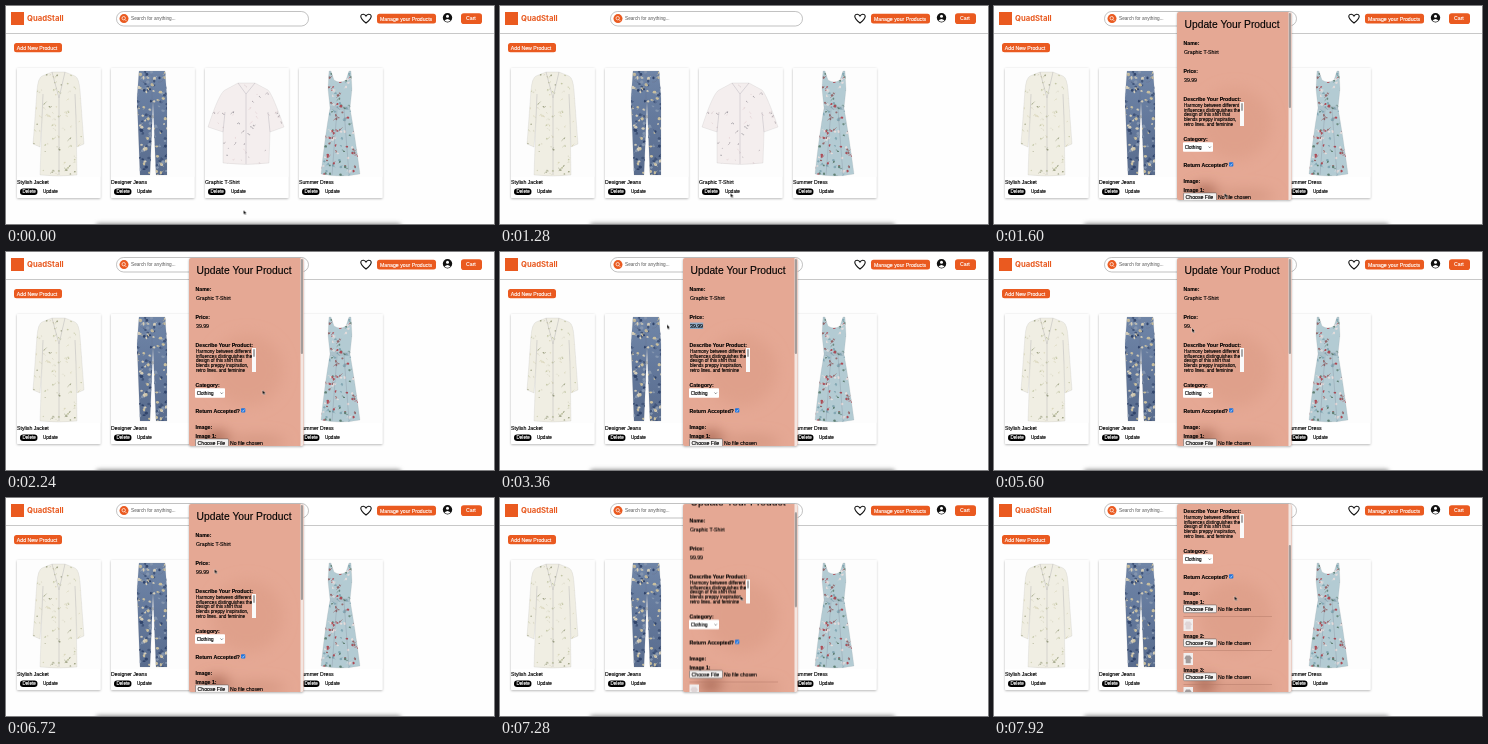
Write an HTML page that moves like this. It is 488 px wide and 218 px high and loops after 8 s.

```html
<!DOCTYPE html>
<html lang="en">
<head>
<meta charset="utf-8">
<title>Manage products</title>
<style>
  html, body { margin: 0; width: 100%; height: 100%; overflow: hidden; background: #fff; }
  svg { display: block; width: 488px; height: 218px; }
  text { font-family: "Liberation Sans", Arial, sans-serif; font-size: 5.2px; fill: #000; stroke: #000; stroke-width: .14px; white-space: pre; }
  .brand { font: 700 7.7px Inter, sans-serif; fill: #e8591f; stroke: none; }
  .light { fill: #fff; stroke: #fff; }
  .hint { font-size: 4.7px; fill: #555; stroke: none; }
  .label { font-weight: 700; }
</style>
</head>
<body>
<svg id="stage" viewBox="0 0 488 218" xmlns="http://www.w3.org/2000/svg"></svg>
<script>
const LOOP = 8000;
const ORANGE = '#ea5a20';
const stage = document.getElementById('stage');

const rect = (x, y, w, h, fill, r = 0, extra = '') =>
  `<rect x="${x}" y="${y}" width="${w}" height="${h}" rx="${r}" fill="${fill}" ${extra}/>`;
const text = (x, y, str, extra = '') => `<text x="${x}" y="${y}" ${extra}>${str}</text>`;
const label = (y, str) => text(189.5, y, str, 'class="label"');
const small = size => `style="font-size:${size}px"`;

function randomizer(seed) {
  return () => (seed = (seed * 16807) % 2147483647) / 2147483647;
}

// Scatters short sprigs and blossoms over a garment's bounding box.
function pattern(g, seed) {
  const rnd = randomizer(seed);
  const [x, y, w, h] = g.box;
  let out = '';
  for (let i = 0; i < g.count; i++) {
    const px = x + rnd() * w, py = y + rnd() * h;
    const color = g.tints[i % g.tints.length];
    const dx = rnd() * 6 - 3, dy = rnd() * 5 - 2.5;
    out += `<path d="M${px} ${py}q${dy} ${dx} ${dx} ${dy}" fill="none" stroke="${color}" stroke-width=".6"/>` +
      `<ellipse cx="${px}" cy="${py}" rx="${g.dot * (.6 + rnd() * .6)}" ry="${g.dot * (.5 + rnd() * .7)}" fill="${color}"/>`;
  }
  return out;
}

const products = [
  {
    name: 'Stylish Jacket', fill: '#f0eee3', box: [26, 66, 53, 104], count: 85, dot: .8,
    tints: ['#c3c6a4', '#dbd7bd', '#9fa385', '#dedccb'],
    shape: 'M46 66L59 66 69 70Q73 72 74 84L78 138 71 141 70 112 71 169Q53 171 34 169L36 112 34 141 27 138 31 84Q32 72 36 70Z',
    lines: 'M46 66L53 92 59 66M53 92V169M36 112L37 88M70 112L69 88'
  },
  {
    name: 'Designer Jeans', fill: 'url(#denim)', box: [130, 65, 32, 106], count: 130, dot: 1.5,
    tints: ['#31456c', '#c9bf9f', '#8495ae', '#42567b', '#d3ccb8'],
    shape: 'M133 65H159L161 92 161 169H150L147 96 144 169H134L131 92Z',
    lines: 'M133 69H159M146 69V94M133 71Q134 77 140 76M158 71Q157 77 152 76'
  },
  {
    name: 'Graphic T-Shirt', fill: '#f4eeee', box: [202, 76, 77, 83], count: 60, dot: .5,
    tints: ['#aaa2a8', '#d5c7c9', '#8f8b93', '#e2d2d3'],
    shape: 'M232 77H249L262 84Q266 87 278 121L264 126 263 157Q241 160 217 157L217 126 202 121Q213 87 219 84Z',
    lines: 'M232 77L240 88 249 77M240 88V158M217 126L219 106M264 126L262 106'
  },
  {
    name: 'Summer Dress', fill: '#b3cbd3', box: [314, 65, 41, 106], count: 150, dot: 1.15,
    tints: ['#ad4a54', '#5f7f72', '#e3dcdc', '#84a8b4', '#94676a'],
    shape: 'M323 65H325L328 74Q334 78 340 74L343 65H345L346 83 344 102Q349 130 354 168Q335 172 315 168Q319 130 324 102L322 83Z',
    lines: 'M324 101H344M324 103H344M331 104L326 169M338 104L343 169'
  }
];

function card(p, i) {
  const x = 11 + 94 * i;
  return rect(x, 62, 83.5, 130, '#fff', 1, 'filter="url(#shadow)"') +
    rect(x, 62, 83.5, 109, '#fdfdfd', 1) +
    `<clipPath id="cut${i}"><path d="${p.shape}"/></clipPath>
     <path d="${p.shape}" fill="${p.fill}" stroke="#888" stroke-opacity=".25" stroke-width=".5"/>
     <g clip-path="url(#cut${i})">${pattern(p, 9176 + 57713 * i)}
       <path d="${p.lines}" fill="none" stroke="#667" stroke-opacity=".4" stroke-width=".5"/></g>` +
    text(x, 178, p.name) +
    rect(x + 3, 182.5, 17.5, 6.5, '#000', 3.2) +
    text(x + 5.5, 187.4, 'Delete', `class="light" ${small(4.6)}`) +
    rect(x + 23.5, 182.5, 19, 6.5, '#fff', 3.2) +
    text(x + 26, 187.4, 'Update', small(4.6));
}

const header =
  rect(0, 0, 488, 27, '#fff') + rect(0, 27, 488, 1, '#c8c8c8') +
  rect(5, 6, 13, 13, ORANGE) + text(21, 15.3, 'QuadStall', 'class="brand"') +
  rect(110.5, 5.5, 192, 14.5, '#fff', 7.2, 'stroke="#999" stroke-width=".6"') +
  `<circle cx="118" cy="12.6" r="4.5" fill="${ORANGE}"/>
   <path d="M119 13.6l1.6 1.6M119.4 12.2a1.7 1.7 0 1 1-3.4 0a1.7 1.7 0 1 1 3.4 0" fill="none" stroke="#fff" stroke-width=".7"/>` +
  text(125, 14.3, 'Search for anything...', 'class="hint"') +
  `<path d="M360 17C352 11 355 8 357.4 8.2Q359.2 8.4 360 10Q360.8 8.4 362.6 8.2C365 8 368 11 360 17Z" fill="none" stroke="#111" stroke-width="1.1"/>` +
  rect(371, 7.8, 59, 9.8, ORANGE, 2.5) + text(374, 14.5, 'Manage your Products', 'class="light"') +
  `<circle cx="441.5" cy="11.8" r="4.7" fill="#111"/><circle cx="441.5" cy="10.2" r="1.5" fill="#fff"/>
   <path d="M438.5 14.4q3-3 6 0q-3 2.6-6 0" fill="#fff"/>` +
  rect(455, 7.2, 21, 10.8, ORANGE, 2.8) + text(460, 14.4, 'Cart', 'class="light"');

const blurb = ['Harmony between different', 'influences distinguishes the',
  'design of this shirt that', 'blends preppy inspiration,', 'retro lines, and feminine'];

const textarea = `<clipPath id="areaCut"><rect x="189" y="96" width="61" height="24"/></clipPath>
  <g clip-path="url(#areaCut)">` +
  blurb.map((line, i) => text(190, 100.6 + 4.9 * i, line, small(4.6))).join('') +
  rect(246, 96, 4, 24, '#fafafa') + rect(247, 97, 2, 8, '#aaa', 1) + '</g>';

function imageField(n) {
  const y = 185.5 + 34 * (n - 1);
  return label(y, `Image ${n}:`) +
    rect(189.5, y + 1.4, 33, 7.8, '#f3f0ef', 1, 'stroke="#555" stroke-width=".5"') +
    text(191.5, y + 7.1, 'Choose File') + text(224, y + 7.1, 'No file chosen') +
    rect(189.5, y + 12.8, 88.5, .5, '#b47a68') +
    rect(189.5, y + 15.5, 9.5, 12, '#f1eeee') +
    `<path d="M192 ${y + 18}h4l2 3-1.3 1v3.8h-5v-3.8l-1.3-1z" fill="${n === 1 ? '#dfd5d6' : '#a39b9b'}"/>`;
}

// Price field contents and the moment each one appears.
const prices = [[0, '39.99'], [5000, '9'], [5200, '99'], [5420, '99.'], [5640, '99.9'], [5860, '99.99']];

const modal = `<g id="modal">` +
  rect(183, 6, 114.5, 188, '#e5a894', 2, 'filter="url(#shadow)"') +
  `<g clip-path="url(#modalCut)">
   <g filter="url(#blur)">
     <ellipse cx="241" cy="118" rx="36" ry="36" fill="#dfa08b"/>
     <ellipse cx="211" cy="187" rx="13" ry="8" fill="#a96954"/>
     <ellipse cx="250" cy="190" rx="30" ry="6" fill="#d39580"/>
   </g>
   <g id="content">` +
  text(190.5, 22, 'Update Your Product', small(10.3)) +
  label(39, 'Name:') + text(190, 48, 'Graphic T-Shirt') +
  label(67, 'Price:') + rect(190, 70.6, 13.2, 6.4, '#91abc6', 0, 'id="selection"') +
  prices.map(([, value], i) => text(190, 75.8, value, `id="price${i}"`)).join('') +
  label(95, 'Describe Your Product:') + textarea +
  label(135, 'Category:') + rect(189, 136.2, 30, 9.6, '#fff', .8) +
  text(190.7, 142.6, 'Clothing', small(4.6)) +
  `<path d="M214.5 140.5l1.2 1.3 1.2-1.3" fill="none" stroke="#222" stroke-width=".5"/>` +
  label(160.5, 'Return Accepted?') + rect(235, 156.3, 4.3, 4.3, '#1f73dc', .8) +
  `<path d="M236 158.5l.9 1 1.5-2" fill="none" stroke="#fff" stroke-width=".6"/>` +
  label(176.5, 'Image:') + [1, 2, 3].map(imageField).join('') + '</g>' +
  rect(294.5, 6, 3, 188, '#f3e6e1') + rect(294.8, 7, 2.2, 95, '#a39d9b', 1.1, 'id="thumb"') + '</g></g>';

stage.innerHTML = `<defs>
    <filter id="shadow" x="-10%" y="-10%" width="120%" height="120%">
      <feDropShadow dx="0" dy=".8" stdDeviation="1.2" flood-opacity=".3"/></filter>
    <filter id="blur" x="-30%" y="-30%" width="160%" height="160%"><feGaussianBlur stdDeviation="7"/></filter>
    <filter id="soft" x="-5%" y="-100%" width="110%" height="300%"><feGaussianBlur stdDeviation="2"/></filter>
    <linearGradient id="denim" x2="0" y2="1"><stop stop-color="#7086a8"/><stop offset=".5" stop-color="#63789b"/><stop offset="1" stop-color="#596c8d"/></linearGradient>
    <clipPath id="modalCut"><rect x="183" y="6" width="114.5" height="188" rx="2"/></clipPath>
  </defs>` +
  rect(0, 0, 488, 218, '#fefefe') + header +
  rect(8, 37, 48, 9.2, ORANGE, 2.5) + text(10.8, 43.6, 'Add New Product', 'class="light"') +
  products.map(card).join('') + rect(90, 217.5, 305, 8, '#888', 3, 'filter="url(#soft)"') + modal +
  `<path id="cursor" d="M0 0V4.4L1 3.5 1.7 5 2.5 4.6 1.8 3.2H3.1Z" fill="#000" stroke="#fff" stroke-width=".35"/>`;

function play(id, steps, toFrame, easing = 'ease-in-out') {
  const frames = steps.map(([time, ...values]) => ({ offset: time / LOOP, easing, ...toFrame(...values) }));
  document.getElementById(id).animate(frames, { duration: LOOP, iterations: Infinity })
    .startTime = document.timeline.currentTime;
}
const move = (x, y) => ({ transform: `translate(${x}px, ${y}px)` });
const fade = opacity => ({ opacity });

play('cursor', [
  [0, 237.5, 204], [400, 237.5, 204], [1050, 230.5, 187], [1600, 230.5, 187],
  [2080, 256.5, 138], [2400, 256.5, 138], [2840, 204, 72], [2960, 204, 72],
  [3280, 167, 72.5], [3700, 167, 72.5], [4320, 198, 76], [5900, 198, 76],
  [6500, 208.5, 71], [6720, 208.5, 71], [7040, 240.5, 98], [LOOP, 240.5, 98]
], move);

play('modal', [[0, 0], [1520, 1], [LOOP, 1]], fade, 'step-end');

document.getElementById('selection').style.transformOrigin = '203.2px 74px';
play('selection', [[0, 0], [2960, 0], [3200, 1], [4999, 1], [5000, 0], [LOOP, 0]],
  scale => ({ transform: `scaleX(${scale})` }), 'linear');

prices.forEach(([start], i) => {
  const end = i + 1 < prices.length ? prices[i + 1][0] : LOOP;
  const last = end < LOOP ? 0 : 1;
  play(`price${i}`, [[0, start ? 0 : 1], [start, 1], [end, last], [LOOP, last]], fade, 'step-end');
});

const scroll = [[0, 0], [7080, 0], [7760, 80], [LOOP, 80]];
play('content', scroll, y => move(0, -y));
play('thumb', scroll, y => move(0, y / 2));
</script>
</body>
</html>
```
